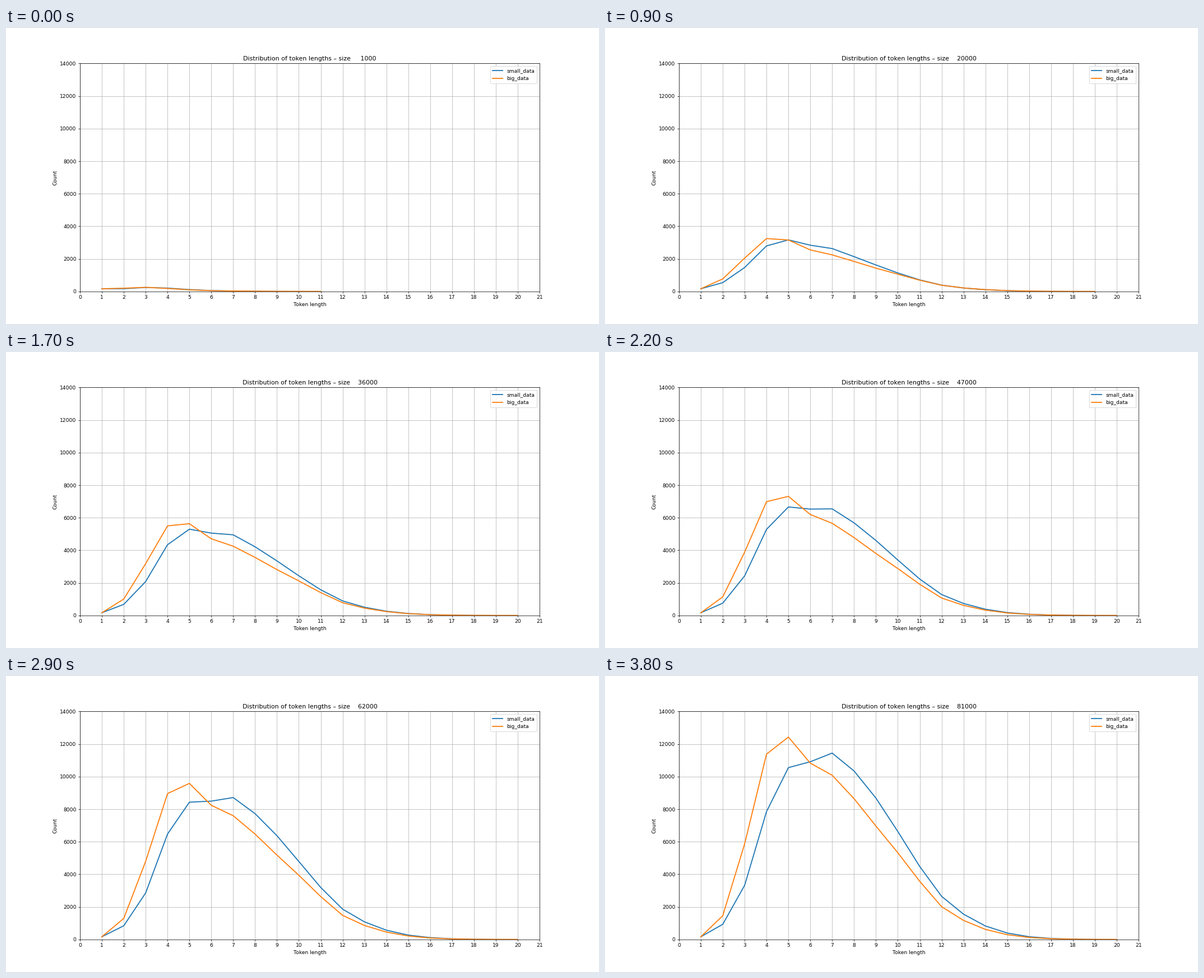
Write a matplotlib script that moves like this. It is 1058 px wide and 529 px high and loops after 3.9 s.

```python
import numpy as np
import matplotlib.pyplot as plt
from matplotlib.animation import FuncAnimation

FRAMES, INTERVAL = 39, 100
WIDTH, HEIGHT, DPI = 1058, 529, 66.125
REF_SIZE = 62000   # vocabulary size at which the key counts below hold
SINGLES = 165      # single-character tokens, the same for every size
LENGTHS = np.arange(1, 21)

# Counts for lengths 2 to 12; longer tokens thin out by a falling ratio.
SMALL_SHAPE = [840, 2860, 6490, 8450, 8515, 8735, 7745, 6385, 4800, 3200, 1865]
BIG_SHAPE = [1290, 4800, 8965, 9590, 8245, 7605, 6475, 5185, 3945, 2635, 1480]

# Growth exponent of each token length: long tokens multiply faster.
SMALL_GROWTH = 0.04 + 0.5 * np.log(LENGTHS)
BIG_GROWTH = 1.16 - 1.86 * LENGTHS ** -1.4


def with_tail(shape):
    ratios = np.linspace(0.58, 0.2, len(LENGTHS) - len(shape) - 1)
    return np.concatenate([[SINGLES], shape, shape[-1] * np.cumprod(ratios)])


def counts(shape, growth, size):
    """Power-law growth per length, with long tokens held back early on."""
    delay = 400 * np.clip(LENGTHS - 3, 0, None)
    result = (with_tail(shape) * (size / REF_SIZE) ** growth
              * np.exp(-delay * (1 / size - 1 / REF_SIZE)))
    result[0] = SINGLES
    # All counts together make up the vocabulary size.
    result[2:] *= (size - result[:2].sum()) / result[2:].sum()
    return result


def size_at(frame):
    thousands = np.interp(frame, [0, 17, 29, 34, 38], [1, 36, 62, 74, 81])
    return int(round(thousands)) * 1000


def longest(size):
    return min(20, int(11.35 + 8 * np.log(size / 1000) / np.log(20)))


fig, ax = plt.subplots(figsize=(WIDTH / DPI, HEIGHT / DPI), dpi=DPI)
fig.subplots_adjust(left=132 / WIDTH, right=952 / WIDTH)

series = {"small_data": (SMALL_SHAPE, SMALL_GROWTH),
          "big_data": (BIG_SHAPE, BIG_GROWTH)}
lines = {name: ax.plot([], [], lw=2, label=name)[0] for name in series}

ax.set(xlim=(0, 21), ylim=(0, 14000), xticks=range(22),
       xlabel="Token length", ylabel="Count")
ax.grid(True)
ax.legend(loc="upper right", borderpad=0.42, labelspacing=0.55)
title = ax.set_title("")


def update(frame):
    size = size_at(frame)
    n = longest(size)
    for name, line in lines.items():
        line.set_data(LENGTHS[:n], counts(*series[name], size)[:n])
    title.set_text(f"Distribution of token lengths – size {size:8d}")
    return [*lines.values(), title]


anim = FuncAnimation(fig, update, frames=FRAMES, interval=INTERVAL,
                     init_func=lambda: update(0), repeat=True, repeat_delay=0)
plt.show()
```
